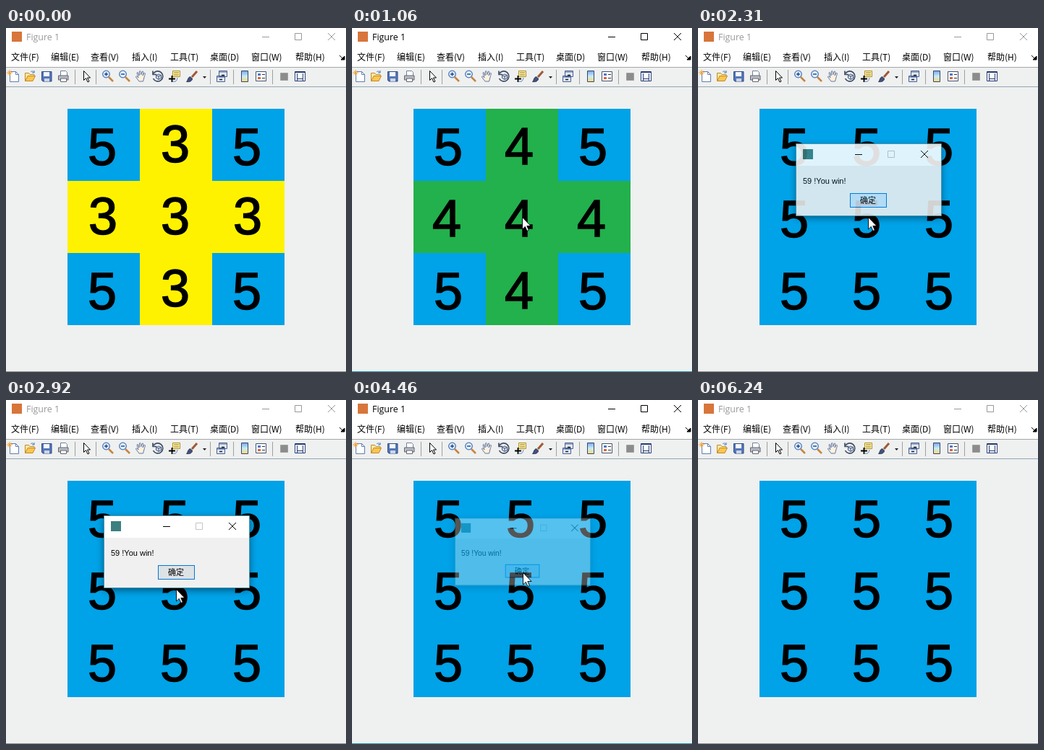
These frames come from a looping animation (470 px wide and 477 px high, 6310 ms). An HTML page:

```html
<!DOCTYPE html>
<html lang="zh">
<head>
<meta charset="utf-8">
<style>
html, body { margin: 0; width: 100%; height: 100%; overflow: hidden; background: #eff0f0; }
svg { display: block; }
text { font: 12px "Noto Sans CJK SC", sans-serif; }
.title { font: 12.4px "Open Sans", sans-serif; }
.digit { font: 72px "Liberation Sans", Arial, sans-serif; stroke: #000; stroke-width: 1.5; }
.msg { font: 11px "Liberation Sans", Arial, sans-serif; }
.ok { font-size: 11px; }
.line { fill: none; stroke: #000; }
#dialog { transform-origin: 236px 211px; }
#panel { filter: drop-shadow(0 3px 5px rgba(0, 0, 0, .45)); }
</style>
</head>
<body>
<svg width="470" height="477" viewBox="0 0 470 477">
  <rect width="470" height="477" fill="#eff0f0"/>
  <rect width="470" height="54" fill="#fff"/>
  <path d="M0 54.5H470" stroke="#a3a6a8"/>
  <path d="M0 81.5H470" stroke="#93a9b0"/>
  <rect x="8" y="5" width="14" height="14" fill="#d8753a"/>
  <g id="caption">
    <text class="title" x="28" y="17">Figure 1</text>
    <path class="line" style="stroke:currentColor" d="M354 12.5h10M399.5 7.5h9v9h-9zM445 7l10 10m0-10l-10 10"/>
  </g>
  <path id="edge" d="M0 476.5H470"/>
  <g id="menu"></g>
  <path d="M461 38l4 4m3-3v5h-5z" stroke="#000"/>

  <g id="toolbar" fill="none" stroke-linejoin="round">
    <path class="line" style="stroke:#a0a0a0" d="M95.5 58v20M124.5 58v20M282.5 58v20M314.5 58v20M368.5 58v20"/>
    <path d="M5.5 60.500h8l4 4v10h-12z" fill="#fff" stroke="#5f7fb0"/>
    <path d="M13.500 60.500v4h4" stroke="#5f7fb0"/>
    <path d="M5 58v8M1 62h8M2.500 59.500l5 5m0-5l-5 5" stroke="#f0a030"/>
    <path d="M26.500 73.500v-11h5l1.500 2h6v3" fill="#ffe9a0" stroke="#c08a28"/>
    <path d="M26.500 73.500l3.500-7h10.500l-3.500 7z" fill="#fbc64f" stroke="#c08a28"/>
    <path d="M34 61c2-2 4-1 5 1m0-3v3h-3" stroke="#4a78b8"/>
    <path d="M49.500 60.500h13.500v13.500h-12l-1.500-1.500z" fill="#5577b8" stroke="#2e4a86"/>
    <path d="M52 61h8v6h-8z" fill="#f4f7fc"/><path d="M53 70h7v4h-7z" fill="#cdd6e6"/>
    <path d="M75.500 66v-6.500h7l2 2v4.500" fill="#fff" stroke="#7080a0"/>
    <path d="M72.500 66h13.500v6h-13.500z" fill="#b9bcc4" stroke="#62666e"/>
    <path d="M75.500 70h8v4.500h-8z" fill="#fff" stroke="#62666e"/>
    <path d="M107.500 59.500v13l3-3 2.500 5.500 2-1-2.500-5h4z" fill="#fff" stroke="#000"/>
    <g id="lens">
      <path d="M142 68l6 6" stroke="#c8843c" stroke-width="2.500"/>
      <circle cx="138.500" cy="64" r="4.800" fill="#e4f2ff" stroke="#4a78b8" stroke-width="1.300"/>
      <path d="M136 64h5" stroke="#1d3f86" stroke-width="1.400"/>
    </g>
    <use href="#lens" x="23"/>
    <path d="M138.500 61.500v5" stroke="#1d3f86" stroke-width="1.400"/>
    <path d="M184 74l-4.500-6c0-2 2-1 3.500 1l-2-7c1-1.500 2 0 3 4l.5-6c1-1.500 2-.5 2 5l2-5c1.500-.5 1.500 1 .5 6l2-3.500c2-.5 1.500 1 .5 4l-2 7.500z" fill="#fff1dc" stroke="#6078a8"/>
    <path d="M204 63a7 7 0 1 1-.5 7M203 59.500v5h5" stroke="#3c4c66" stroke-width="1.700"/>
    <path d="M207.500 65.500l3.500-1.500 3.500 1.500v4l-3.500 2-3.500-2zl3.500 1.500 3.500-1.500m-3.500 1.500v4" fill="#d5deee" stroke="#455578"/>
    <path d="M230.500 59.500h10v8h-10z" fill="#fff3a0" stroke="#b09030"/>
    <path d="M232 62h7m-7 3h7" stroke="#8a7430"/>
    <path d="M229.500 66v9M225 70.500h9" stroke="#000" stroke-width="1.800"/>
    <path d="M231 74c4 1 5-1 6-5" stroke="#4a78b8"/>
    <path d="M264 60l-7 8" stroke="#a05a34" stroke-width="3"/>
    <path d="M249.500 74.500c2-1 1.500-6 5-7l3 2.500c0 4-4 5-8 4.500z" fill="#44527c" stroke="#2c3858"/>
    <path d="M272 67h5l-2.500 3z" fill="#222"/>
    <path d="M294.500 59.500h11v8h-11zM291.500 66.500h11v8h-11z" fill="#dfe9f8" stroke="#4a6090"/>
    <path d="M294 61h12M291 68h12" stroke="#4a6090"/>
    <path d="M295 71.500h4m-1-6h4" stroke="#222" stroke-width="1.600"/>
    <rect x="325.500" y="59.500" width="9" height="15" fill="url(#bar)" stroke="#34486c"/>
    <path d="M345.500 60.500h14v13h-14z" fill="#fff" stroke="#44526c"/>
    <path d="M348 63h4v3h-4z" fill="#4a78c8"/><path d="M348 68h4v3h-4z" fill="#d86838"/>
    <path d="M354 64.500h4m-4 5h4" stroke="#333"/>
    <path d="M379.500 62.500h10v10h-10z" fill="#8c8c8c" stroke="#a0a0a0"/>
    <path d="M399.500 60.500h14v13h-14z" fill="#fff" stroke="#223a70"/>
    <path d="M400 61.500h13M402.500 63v10m8-10v10M403 70.500h8" stroke="#223a70"/>
  </g>
  <linearGradient id="bar" x2="0" y2="1">
    <stop stop-color="#78a8f0"/><stop offset=".5" stop-color="#c8ecf4"/><stop offset="1" stop-color="#ffd878"/>
  </linearGradient>

  <g id="board"></g>

  <g id="dialog">
    <g id="panel">
      <path d="M136 161h200v99h-200z" fill="#f0f0f0"/>
      <path d="M136 161h200v30h-200z" fill="#fff"/>
      <path d="M135.500 160.500h201v100h-201z" fill="none" stroke="#4b98ad"/>
    </g>
    <rect x="145" y="168" width="14" height="14" fill="#3c7f80"/>
    <path class="line" d="M217 175.500h10M308 170l10 10m0-10l-10 10"/>
    <path class="line" style="stroke:#c4c4c4" d="M262.500 170.500h9v9h-9z"/>
    <text class="msg" x="145" y="216">59 !You win!</text>
    <rect id="button" x="210.500" y="229.500" width="50" height="19" stroke="#0078d7"/>
    <text class="ok" x="224" y="243">确定</text>
  </g>

  <path id="cursor" d="M.5 .5v16.500l3.800-3.600 2.700 6 2.400-1-2.600-5.900h5.200z" fill="#fff" stroke="#000" stroke-width=".9"/>
  <circle id="click" r="12" fill="#fff000" fill-opacity=".45"/>
</svg>
<script>
const LOOP = 6310, START = 130, TICK = 77.2;
const $ = id => document.getElementById(id);
const show = (el, on) => el.style.display = on ? '' : 'none';
const clamp = v => Math.min(1, Math.max(0, v));
const mix = (a, b, p) => a + (b - a) * p;

const menuX = [7, 62, 117, 174, 227, 282, 339, 400];
$('menu').innerHTML = '文件(F) 编辑(E) 查看(V) 插入(I) 工具(T) 桌面(D) 窗口(W) 帮助(H)'.split(' ')
  .map((label, i) => `<text x="${menuX[i]}" y="45">${label}</text>`).join('');

const tiles = {
  3: { fill: '#fff200', x: 29, y: 74 },
  4: { fill: '#22b14c', x: 26, y: 77 },
  5: { fill: '#00a2e8', x: 28, y: 78 }
};
let shownValue;

// Corners always hold 5; the central cross holds the given value.
function drawBoard(value) {
  if (value === shownValue) return;
  shownValue = value;
  let html = '';
  for (let i = 0; i < 9; i++) {
    const col = i % 3, row = (i - col) / 3;
    const n = col !== 1 && row !== 1 ? 5 : value, tile = tiles[n];
    html += `<g transform="translate(${85 + col * 100} ${112 + row * 100})">
      <rect width="100" height="100" fill="${tile.fill}" shape-rendering="crispEdges"/>
      <text class="digit" x="${tile.x}" y="${tile.y}">${n}</text></g>`;
  }
  $('board').innerHTML = html;
}

function cursorAt(k) {
  if (k < 8) {
    const p = 1 - (1 - clamp(k / 5)) ** 2;
    return [mix(353, 236.5, p), mix(453, 262, p)];
  }
  if (k < 65) {
    const p = clamp((k - 40) / 8), s = p * p * (3 - 2 * p);
    return [mix(235, 236, s), mix(262, 239, s)];
  }
  const q = (k - 64) / 7;
  return [237 + 194 * q ** 1.88, 239 + 231 * q ** 1.26];
}

function buttonColor(k, y) {
  if (k >= 54) return '#cce4f7';
  if (k >= 41 && y < 249) return '#e5f1fb';
  const p = clamp((k - 28) / 10);
  return `rgb(${mix(204, 225, p)}, ${mix(228, 225, p)}, ${mix(247, 225, p)})`;
}

function render(t) {
  const k = Math.floor((t - START) / TICK);
  const [x, y] = cursorAt(k);
  const active = k >= 11 && k < 26 || k >= 55 && k < 79;

  $('caption').setAttribute('fill', active ? '#000' : '#999');
  $('caption').setAttribute('color', active ? '#000' : '#999');
  $('edge').setAttribute('stroke', active ? '#1f98b4' : '#8a8c8c');
  drawBoard(k < 11 ? 3 : k < 24 ? 4 : 5);

  const opening = 1 - (1 - clamp((k - 25) / 6)) ** 3;
  const closing = clamp((k - 54) / 3);
  const scale = 1 - .06 * (1 - clamp((k - 25) / 3)) - .1 * closing;
  show($('dialog'), k >= 26 && k < 57);
  $('dialog').style.opacity = opening * (1 - closing);
  $('dialog').style.transform = `scale(${scale})`;
  $('button').setAttribute('fill', buttonColor(k, y));

  show($('cursor'), k >= 0 && k < 72);
  $('cursor').setAttribute('transform', `translate(${Math.round(x)} ${Math.round(y)})`);
  show($('click'), k === 11 || k === 24 || k === 54);
  $('click').setAttribute('cx', x);
  $('click').setAttribute('cy', y);
}

const begin = performance.now();
function tick() {
  render((performance.now() - begin) % LOOP);
  requestAnimationFrame(tick);
}
tick();
</script>
</body>
</html>
```
